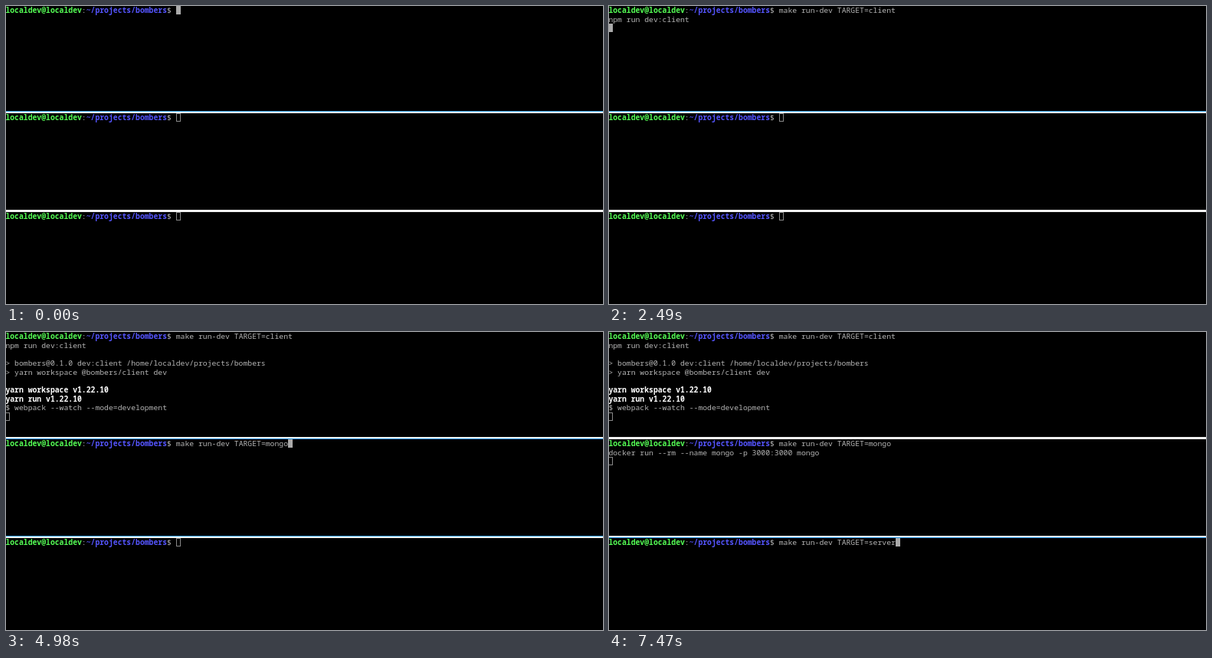
An HTML page that plays this animation: 779x389 px, repeating every 8000 ms.

```html
<!DOCTYPE html>
<html lang="en">
<head>
<meta charset="utf-8">
<title>Terminal panes</title>
<style>
  html, body { margin: 0; width: 100%; height: 100%; overflow: hidden; background: #000; }
  #stage {
    position: relative; width: 779px; height: 389px; overflow: hidden; background: #000;
    font: 9.75px/11.66px "Noto Sans Mono", monospace; color: #b4b4b4;
    font-variant-ligatures: none;
  }
  .pane { position: absolute; left: -0.6px; white-space: pre; }
  .line { height: 11.66px; }
  .user { color: #5f5; font-weight: bold; }
  .path { color: #55f; font-weight: bold; }
  .bold { color: #fff; font-weight: bold; }
  .cursor { display: inline-block; box-sizing: border-box; width: 6px; height: 11px; vertical-align: top; border: 1px solid #888; }
  .focus .cursor { background: #aaa; border-color: #aaa; }
  .rule { position: absolute; left: 0; width: 100%; height: 3px; background: #f4f4f4; }
  .rule.above { background: linear-gradient(#3aaef0 1px, #f4f4f4 1px); }
  .rule.below { background: linear-gradient(#f4f4f4 2px, #1c93e6 2px); }
</style>
</head>
<body>
<div id="stage"></div>
<script>
const STEP = 830, LOOP = 8000;
const TYPED = 'make run-dev TARGET=';
const PROMPT = '<span class="user">localdev@localdev</span>:<span class="path">~/projects/bombers</span>$ ';

// Each entry is [step at which it appears, text].
const panes = [
  {
    top: 0, focus: [0, 4],
    typing: [[1, TYPED], [2, TYPED + 'cli'], [3, TYPED + 'client']],
    output: [
      [3, 'npm run dev:client'],
      [4, ''],
      [4, '&gt; bombers@0.1.0 dev:client /home/localdev/projects/bombers'],
      [4, '&gt; yarn workspace @bombers/client dev'],
      [4, ''],
      [5, '<span class="bold">yarn workspace v1.22.10</span>'],
      [6, '<span class="bold">yarn run v1.22.10</span>'],
      [6, '$ webpack --watch --mode=development']
    ]
  },
  {
    top: 140, focus: [4, 8],
    typing: [[4, TYPED], [5, TYPED + 'm'], [6, TYPED + 'mongo']],
    output: [[7, 'docker run --rm --name mongo -p 3000:3000 mongo']]
  },
  {
    top: 269, focus: [8, 10],
    typing: [[8, TYPED], [9, TYPED + 'server']],
    output: []
  }
];

// A rule is tinted on the side that touches the focused pane.
const rules = [
  { top: 137, above: panes[0], below: panes[1] },
  { top: 266, above: panes[1], below: panes[2] }
];

const stage = document.getElementById('stage');
const focused = ({ focus: [from, to] }, step) => step >= from && step < to;

function addBox(item) {
  item.el = document.createElement('div');
  item.el.style.top = item.top + 'px';
  stage.append(item.el);
}

function paneHtml(pane, step) {
  const shown = list => list.filter(([at]) => at <= step).map(([, text]) => text);
  const lines = [PROMPT + (shown(pane.typing).pop() || '')];
  const output = shown(pane.output);
  if (output.length) lines.push(...output, '');
  lines[lines.length - 1] += '<span class="cursor"></span>';
  return lines.map(text => `<div class="line">${text}</div>`).join('');
}

function render(step) {
  for (const pane of panes) {
    pane.el.className = focused(pane, step) ? 'pane focus' : 'pane';
    pane.el.innerHTML = paneHtml(pane, step);
  }
  for (const rule of rules) {
    const side = ['above', 'below'].find(key => focused(rule[key], step)) || '';
    rule.el.className = 'rule ' + side;
  }
}

let current = -1;
function tick() {
  const step = Math.floor(performance.now() % LOOP / STEP);
  if (step !== current) render(current = step);
  requestAnimationFrame(tick);
}

[...panes, ...rules].forEach(addBox);
tick();
</script>
</body>
</html>
```
